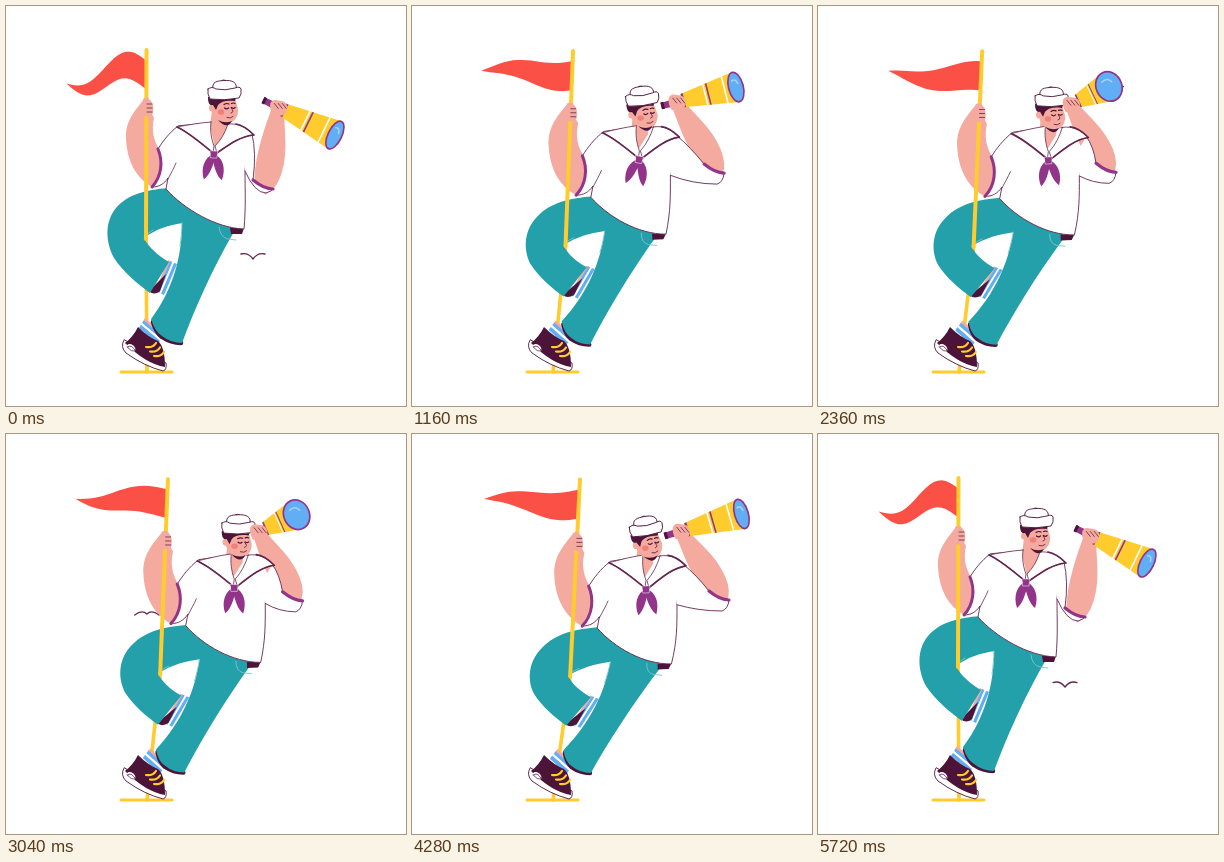
Write an HTML page with a canvas that moves like this. It is 400 px wide and 400 px high and loops after 5.76 s.

```html
<!DOCTYPE html>
<html lang="en">
<head>
<meta charset="utf-8">
<title>Sailor on lookout</title>
<style>
html, body { margin: 0; width: 100%; height: 100%; overflow: hidden; background: #fff; }
canvas { display: block; width: 100vw; height: 100vh; }
</style>
</head>
<body>
<canvas id="stage"></canvas>
<script>
const LOOP = 5760, TAU = Math.PI * 2;
const cv = document.getElementById('stage');
const g = cv.getContext('2d');
const C = {
  skin: '#f4aa9e', blush: '#f08078', teal: '#23a0aa', seam: '#77c8cc', yellow: '#ffcb2d',
  red: '#fa5046', plum: '#92348a', dark: '#4b1438', line: '#64264f', blue: '#62aef5', white: '#fff'
};

const mix = (a, b, k) => a + (b - a) * k;
const clamp = v => Math.max(0, Math.min(1, v));
const ease = (t, a, b) => { const s = clamp((t - a) / (b - a)); return s * s * (3 - 2 * s); };

// Periodic monotone cubic through [time, ...values] points.
function track(...keys) {
  const n = keys.length;
  const val = (i, c) => keys[(i + n) % n][c] + (c ? 0 : Math.floor(i / n) * LOOP);
  const rate = (i, c) => (val(i + 1, c) - val(i, c)) / (val(i + 1, 0) - val(i, 0));
  const tangent = (i, c) => {
    const a = rate(i - 1, c), b = rate(i, c);
    return a * b > 0 ? 2 * a * b / (a + b) : 0;
  };
  return time => {
    const t = (time + LOOP) % LOOP;
    let i = n - 1;
    while (keys[i][0] > t) i--;
    const h = val(i + 1, 0) - val(i, 0), s = (t - val(i, 0)) / h, r = 1 - s;
    return keys[0].slice(1).map((_, j) => {
      const c = j + 1;
      return r * r * (1 + 2 * s) * val(i, c) + s * s * (3 - 2 * s) * val(i + 1, c) +
        s * r * h * (r * tangent(i, c) - s * tangent(i + 1, c));
    });
  };
}

const leanAt = track([0, 0], [640, .48], [1800, .92], [3040, .78], [4280, 1], [4920, .43], [5720, 0]);
const birdAt = track([0, 247, 252], [640, 266, 213], [1800, 329, 94], [2020, 332, 84], [2400, 286, 84],
  [3040, 141, 179], [3850, 74, 105], [4280, 118, 72], [5720, 247, 252]);

let lean = 0;

// Bends a point of the upright figure: feet stay put, the body leans and sinks.
function warp(x, y) {
  const reach = Math.min(1, .8 + (x - 100) / 350);
  const dx = 26 * reach * clamp((355 - y) / 160);
  const sink = 9 * Math.exp(-(((y - 200) / 110) ** 2));
  const tilt = y < 260 ? .07 * (205 - Math.max(x, 172)) * clamp((260 - y) / 50) : 0;
  return [x + lean * dx, y + lean * (sink + tilt)];
}

function paint(path, fill, stroke, width = .9) {
  if (typeof path === 'string') path = new Path2D(path);
  if (fill) { g.fillStyle = fill; g.fill(path); }
  if (stroke) { g.strokeStyle = stroke; g.lineWidth = width; g.stroke(path); }
}

// Same as paint, with every point warped.
const bend = (path, ...style) =>
  paint(path.replace(/([\d.]+),([\d.]+)/g, (_, x, y) => warp(+x, +y).join()), ...style);

function placed(x, y, turn, fn) {
  g.save();
  g.translate(x, y);
  g.rotate(turn);
  fn();
  g.restore();
}

function oval(x, y, rx, ry, fill, turn = 0) {
  g.beginPath();
  g.ellipse(x, y, rx, ry, turn, 0, TAU);
  g.fillStyle = fill;
  g.fill();
}

// Stripes parallel to the cuff a-b, going out along (dx, dy).
function sock(ax, ay, bx, by, dx, dy) {
  [[0, .25, C.skin], [.22, .5, C.blue], [.5, .68, C.white], [.68, 1, C.blue]].forEach(([s, e, col]) => {
    bend(`M${ax + dx * s},${ay + dy * s} L${bx + dx * s},${by + dy * s} ` +
         `L${bx + dx * e},${by + dy * e} L${ax + dx * e},${ay + dy * e}Z`, col);
  });
}

function shoe() {
  paint('M118,334 Q114,341 120,347 Q138,360 157,365 Q161,364 160,357 L150,352Z', C.white, C.dark);
  paint('M132,321 Q142,331 152,335 Q159,341 159,361 Q140,358 119,337 Q127,331 132,321Z', C.dark);
  oval(125, 342, 4.8, 3.4, C.white, .6);
  paint('M121.5,341 Q125,338 129,344 Q126,347 121.5,341Z', null, C.line, .8);
  for (let i = 0; i < 3; i++) {
    const x = 140 + i * 4, y = 341 + i * 4.5;
    paint(`M${x},${y} Q${x + 7},${y + 1} ${x + 10},${y - 4}`, null, C.yellow, 2.2);
  }
}

function flag(x, y, t) {
  const loose = 1 - lean, phase = Math.PI - 2 * TAU * t / LOOP;
  const swing = 3 + 7 * loose ** 2, droop = 14 * loose ** 3 - 5, length = 79 + 16 * lean;
  const edge = (u, side) => {
    const mid = swing * (Math.sin(TAU * u + phase) - Math.sin(phase)) + droop * u * u;
    return [x - length * u, y + mid + side * 14.5 * (1 - u ** 1.8)];
  };
  const top = [], bottom = [];
  for (let u = 0; u <= 1.001; u += .05) {
    top.push(edge(Math.min(u, 1), -1));
    bottom.unshift(edge(Math.min(u, 1), 1));
  }
  paint('M' + top.concat(bottom).join('L') + 'Z', C.red);
}

function bird(t) {
  const [x, y] = birdAt(t), w = 14 - 2 * Math.cos(2 * TAU * t / LOOP);
  const up = 2 - 4 * Math.cos(12 * TAU * t / LOOP);
  const wing = s => `M${x},${y + 1} Q${x + s * w * .4},${y - 5 + up * .35} ${x + s * w},${y - 2 + up}`;
  paint(wing(-1) + wing(1), null, C.line, 1.3);
}

function legs() {
  sock(162, 254, 149, 285, 9, 4);
  bend('M143,285 Q148,290 154,285 L160,268Z', C.dark);
  bend('M162,182 C140,184 122,188 110,202 C99,215 99,235 108,252 C118,267 132,278 144,287 L163,256 C153,250 143,242 138,232 C150,223 162,219 178,217 L222,224 L200,205Z', C.teal);
  sock(139, 312, 158, 328, -6, 10);
  shoe();
  bend('M147,316 Q150,326 156,331 Q165,337 175,337', null, C.dark, 4.5);
  bend('M176,217 C176,250 167,284 145,313 Q149,326 156,330 Q165,337 176,337 C188,305 205,265 229,224 L200,205Z', C.teal);
  bend('M176,217 C176,224 175,233 174,240 M138,232 Q141,227 147,224 M213,221 Q214,231 222,233 L230,234', null, C.seam);
  bend('M224,222 L238,222 L236,228 L225,228Z', C.dark);
}

function torso(poleTop) {
  const cuff = 'M152,143 C157,155 156,170 146,181';
  bend('M138,93 C130,104 119,114 120,133 C121,155 130,172 146,181 L156,176 L153,143 C148,135 145,125 148,112Z', C.skin);
  bend('M172,120 C163,127 157,135 152,143 C157,155 156,170 146,181 C153,181 158,178 162,172 L160,183 C178,203 210,222 238,223 C240,200 239,185 239,165 C240,150 243,135 246,128 L232,119 L205,117Z', C.white, C.line);
  bend('M162,173 C165,167 168,162 170,157', null, C.line, .8);
  bend(cuff, null, C.plum, 3);
  paint(`M${poleTop} L${warp(140, 233)}`, null, C.yellow, 4);
  const [x, y] = warp(141, 102);
  paint(`M${x - 4},${y - 9} Q${x},${y - 12} ${x + 3},${y - 8} Q${x + 7},${y - 5} ${x + 6},${y + 5} ` +
        `Q${x + 4},${y + 10} ${x - 3},${y + 8}Z`, C.skin);
  for (let i = -4; i <= 4; i += 4) paint(`M${x},${y + i} h5`, null, C.line, .8);
}

function collar(t) {
  placed(20 * lean, 7 * lean, 0, () =>
    paint('M206,104 L204,120 L209,142 L221,123 L222,110Z', C.skin));
  bend('M205,116 C192,117 182,119 171,121 C182,126 194,136 207,147 L208,140 C205,132 204,124 205,116Z', C.white, C.line, .8);
  bend('M222,118 C232,117 240,121 248,129 C235,130 224,138 211,147 L209,140 C215,134 219,127 222,118Z', C.white, C.line, .8);
  bend('M171,121 C182,126 194,136 207,147 M211,147 C224,138 235,130 248,129 C241,122 236,119 230,118', null, C.line, 1.7);
  // The scarf trails behind the lean.
  const lag = 2 * (leanAt(t + 100)[0] - leanAt(t - 100)[0]);
  placed(...warp(208, 147), lag, () => {
    for (const s of [-1, 1])
      paint(`M${s},1 C${s * 9},5 ${s * 13},15 ${s * 9},27 C${s * 3},22 ${s},14 ${-s * 2},3Z`, C.plum);
    paint('M-4,-2 L4,-2 L3,5 L-3,5Z', C.plum, C.white, .5);
  });
}

function head() {
  paint('M206,91 L229,91 C230,98 233,103 232,106 C231,113 227,117 220,118 C212,117 207,110 206,104Z', C.skin);
  paint('M212,114 Q219,118 226,115 Q221,124 212,114Z', C.dark);
  oval(206, 102, 3, 3.6, C.skin);
  paint('M202,91 L230,91 L229,95 C221,94 215,95 212,99 L210,104 L207,99 C203,100 202,96 202,91Z', C.dark);
  oval(215, 106, 3.3, 2.7, C.blush);
  paint('M218.5,102 q2,1.8 4,0 M225.5,101.5 q1.8,1.6 3.6,0 M218,98.5 q2.5,-1.7 5,-.5 M225.5,97.5 q2,-1 3.5,0', null, C.dark, 1.2);
  paint('M225,102 Q229,106 225,107 M221,111.5 Q224.5,113 227,110.5', null, C.line);
  paint('M214,76 Q217,72 221,75.5', C.white, C.dark);
  paint('M207,84 C205,75 212,75 218,74.5 C226,74 232,76 230,84Z', C.white, C.dark);
  paint('M202,83 Q206,80 210,83 Q219,85 229,82 Q234,80 235,83 Q236,88 233,92 Q218,95 204,93 Q201,88 202,83Z', C.white, C.dark);
}

function rightArm(hx, hy, ex, ey) {
  const dx = ex - hx, dy = ey - hy, len = Math.hypot(dx, dy);
  const p = (u, v) => [hx + dx * u + dy / len * v, hy + dy * u - dx / len * v];
  paint(`M${p(0, 6)} C${p(.25, 9)} ${p(.5, 18)} ${p(.8, 15)} Q${p(1.02, 13)} ${p(1.1, 3)} ` +
        `L${p(1.02, -9)} C${p(.75, -15)} ${p(.35, -11)} ${p(0, -6)}Z`, C.skin);
  const [sx, sy] = warp(246, 128), [ax, ay] = warp(239, 165);
  const drop = 7 + 7 * clamp(lean * 2);
  const inner = [ex - 11, ey - 6], cuff = `Q${ex},${ey + 3} ${ex + 9},${ey + 3}`;
  const sleeve = `M${sx},${sy} Q${mix(sx, ex, .3) + 1},${mix(sy, ey, .45) - 5} ${inner} ${cuff} ` +
    `Q${ex + 8},${ey + drop - 2} ${ex + 2},${ey + drop} Q${mix(ax, ex, .5)},${ey + drop} ${ax},${ay}`;
  paint(sleeve + ` L${sx - 9},${sy + 15}Z`, C.white);
  paint(sleeve, null, C.line);
  paint(`M${inner} ${cuff}`, null, C.plum, 3.2);
}

function telescope(len, depth) {
  const half = u => mix(3.5, 15.5, u);
  const slice = (a, b, col) => paint(
    `M${len * a},${-half(a)} L${len * b},${-half(b)} L${len * b},${half(b)} L${len * a},${half(a)}Z`, col);
  paint(`M0,-3 L${len * .3},-4 L${len * .3},4 L0,3Z`, C.plum);
  paint('M0,-3.5 L3,-3.5 L3,3.5 L0,3.5Z', C.dark);
  slice(.28, 1, C.yellow);
  slice(.28, .31, C.plum);
  slice(.58, .6, C.white);
  slice(.62, .64, C.plum);
  slice(.84, .86, C.white);
  oval(len, 0, depth + .7, 16, C.plum);
  oval(len, 0, depth - 1, 14.2, C.blue);
  paint(`M${len - depth * .35},-7 Q${len + depth * .2},-9 ${len + depth * .35},-3`, null, '#a6d4ff', 1.5);
}

function fist() {
  paint('M-8,-4 Q-6,-9 0,-7 Q8,-7 9,-1 Q10,5 4,8 L-5,8 Q-9,2 -8,-4Z', C.skin);
  for (let x = -4; x <= 4; x += 4) paint(`M${x},-4 l4,5`, null, C.line, .8);
}

function draw(t) {
  [lean] = leanAt(t);
  const raise = 1 - (1 - lean) ** 2;
  const face = ease(t, 900, 2300) - ease(t, 3040, 4100);
  const hx = 217 + 17.5 * lean, hy = 100 + 8 * lean;
  const aim = (26 - 42 * raise - 10 * face) * Math.PI / 180;
  const ex = hx + mix(40, 18, raise) - 3 * face, ey = hy - 6;
  const grip = 17 - 11 * face;
  const handX = ex + grip * Math.cos(aim), handY = ey + grip * Math.sin(aim);
  const poleTop = [140.5 + 27.5 * lean, 44 + 1.5 * lean];

  bird(t);
  flag(poleTop[0] - 1, poleTop[1] + 24.5, t);
  paint('M115,366 L166,366', null, C.yellow, 3);
  paint(`M${warp(140, 233)} L141,366`, null, C.yellow, 3.6);
  legs();
  torso(poleTop);
  rightArm(handX, handY, 258 + 50 * raise - 18 * face, 180 - 17 * raise);
  collar(t);
  placed(hx, hy, (7 * face - 8 * lean) * Math.PI / 180, () => {
    g.translate(-217, -100);
    head();
  });
  placed(ex, ey, aim, () => telescope(80 - 32 * face, 7 + 6 * face));
  placed(handX, handY, 0, fist);
}

function tick() {
  const d = window.devicePixelRatio || 1;
  const w = Math.round(innerWidth * d), h = Math.round(innerHeight * d);
  if (cv.width !== w || cv.height !== h) { cv.width = w; cv.height = h; }
  g.setTransform(1, 0, 0, 1, 0, 0);
  g.fillStyle = C.white;
  g.fillRect(0, 0, w, h);
  g.setTransform(w / 400, 0, 0, h / 400, 0, 0);
  g.lineCap = g.lineJoin = 'round';
  draw((performance.now() - start) % LOOP);
  requestAnimationFrame(tick);
}

const start = performance.now();
tick();
</script>
</body>
</html>
```
